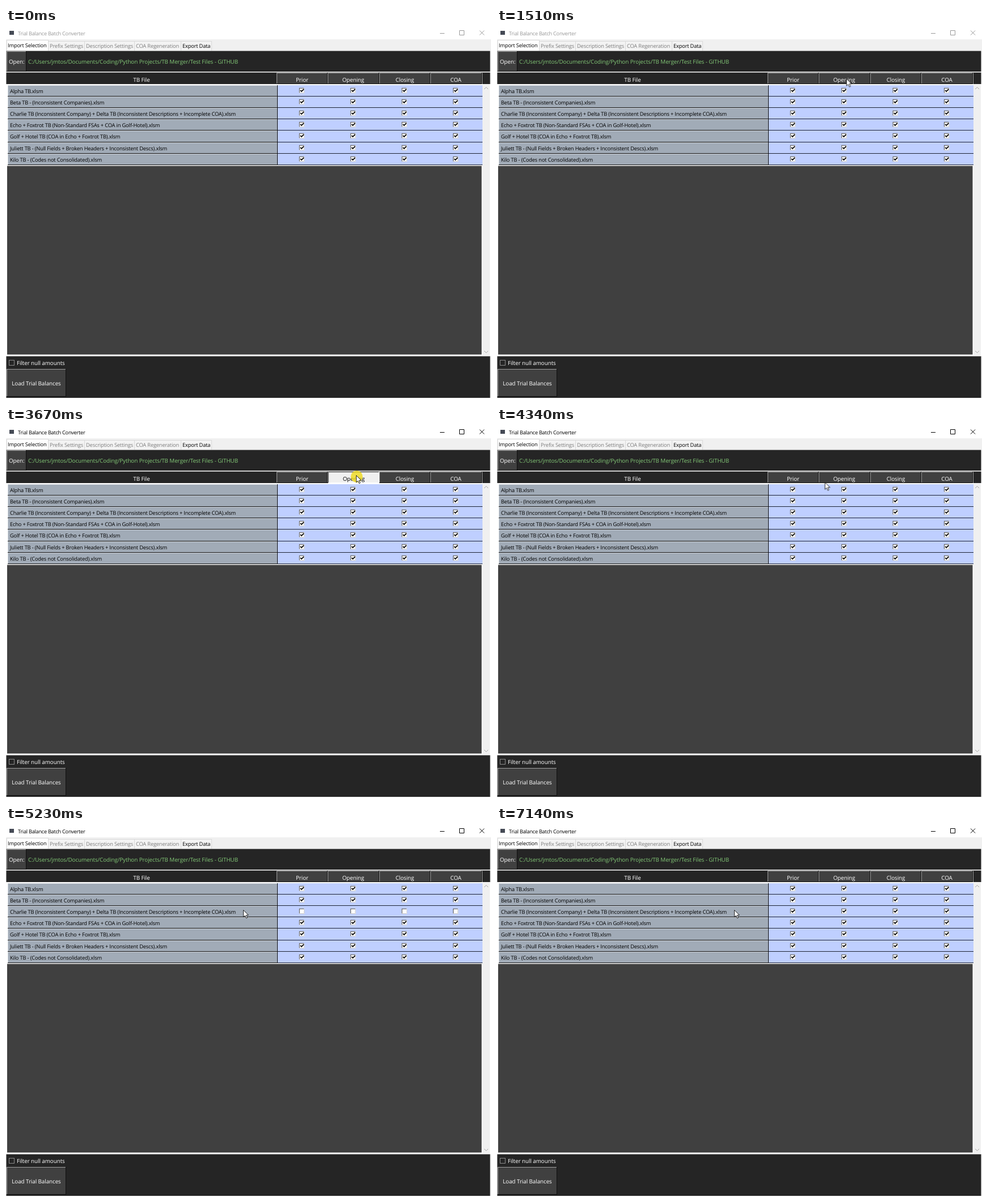
Recreate the animation shown at these times as an HTML page. Size 855x655 px, loop 8000 ms.

```html
<!DOCTYPE html>
<html lang="en">
<head>
<meta charset="utf-8">
<title>Trial Balance Batch Converter</title>
<style>
  html, body { margin: 0; width: 100%; height: 100%; overflow: hidden; background: #fff; }
  svg { display: block; width: 855px; height: 655px; }
  text {
    font: 9.9px "Open Sans", "Noto Sans", sans-serif;
    letter-spacing: -.09px;
    text-rendering: geometricPrecision;
    fill: #fff;
    white-space: pre;
  }
  .small { font-size: 9.3px; letter-spacing: -.18px; fill: #000; }
  .title { font-size: 9.2px; letter-spacing: -.26px; fill: currentColor; }
  .path { fill: #83c877; }
  .mid { text-anchor: middle; }
  .off { fill: #7d7d7d; }
  .line { fill: none; stroke: currentColor; }
  .dark { fill: #000; }

  .window, .press, .check-col, .check-row, .ring { animation: 8s step-end infinite; }
  .window { animation-name: focus; }
  .check-col { animation-name: col-toggle; }
  .check-row { animation-name: row-toggle; }
  .press { opacity: 0; }
  .press.head { animation-name: press-head; }
  .press.row { animation-name: press-row; }
  .ring { opacity: 0; animation-name: ring; }
  .pointer { animation: travel 8s linear infinite; }

  @keyframes focus { 0% { color: #999; } 25.5%, 100% { color: #000; } }
  @keyframes col-toggle { 0%, 45.875%, 100% { opacity: 1; } 26.125% { opacity: 0; } }
  @keyframes row-toggle { 0%, 87.625%, 100% { opacity: 1; } 64.375% { opacity: 0; } }
  @keyframes press-head {
    0%, 27.125%, 46.875%, 100% { opacity: 0; }
    26.125%, 45.875% { opacity: 1; }
  }
  @keyframes press-row {
    0%, 65.375%, 89.25%, 100% { opacity: 0; }
    64.375%, 87.625% { opacity: 1; }
  }
  @keyframes ring {
    0%, 27.125%, 46.875%, 65.375%, 89.25%, 100% { opacity: 0; }
    25.5%, 45.875%, 64.375%, 87.625% { opacity: .8; }
  }
  @keyframes travel {
    0% { transform: translate(818px, 670px); animation-timing-function: step-end; }
    3.125% { transform: translate(818px, 648px); animation-timing-function: cubic-bezier(.25, .45, .55, 1); }
    12.875% { transform: translate(615px, 203px); }
    13.25% { transform: translate(615px, 203px); animation-timing-function: cubic-bezier(.45, .1, .8, .8); }
    16.5% { transform: translate(612px, 147px); animation-timing-function: cubic-bezier(.2, .3, .5, 1); }
    19.875%, 31.625% { transform: translate(616px, 84px); }
    32.625%, 37.75% { transform: translate(616px, 90px); }
    40.75% { transform: translate(617px, 86px); animation-timing-function: step-end; }
    42.75% { transform: translate(617px, 85px); }
    51.625% { transform: translate(617px, 85px); animation-timing-function: cubic-bezier(.35, .1, .65, .9); }
    61.25%, 61.875% { transform: translate(426px, 145px); }
    62.25%, 100% { transform: translate(418px, 148px); }
  }
</style>
</head>
<body>
<svg viewBox="0 0 855 655">
  <rect width="855" height="655" fill="#fff"/>

  <g class="window">
    <rect x="6" y="5" width="8" height="7" fill="#454a55"/>
    <text class="title" x="21" y="12.6">Trial Balance Batch Converter</text>
    <path class="line" d="M765 9.5h8M799.5 4.5h8v8h-8zM835 4.5l8 8m0-8l-8 8"/>
  </g>

  <rect y="20" width="855" height="20" fill="#f0f0f0"/>
  <g id="tabs"></g>

  <rect x=".5" y="40.5" width="853" height="36.5" fill="#252525"/>
  <rect x=".5" y="78.5" width="853" height="20.5" fill="#252525"/>
  <rect x="2" y="243.5" width="836.5" height="333" fill="#404040"/>
  <rect x="840" y="100" width="13" height="478" fill="#f0f0f0"/>
  <rect x=".5" y="579.5" width="853" height="73.5" fill="#252525"/>
  <path d="M843 108l3.5-3.5 3.5 3.5M843 570l3.5 3.5 3.5-3.5" fill="none" stroke="#a3a3a3"/>

  <g id="buttons"></g>
  <text x="5" y="63">Open:</text>
  <text class="path" x="39" y="63">C:/Users/jmtos/Documents/Coding/Python Projects/TB Merger/Test Files - GITHUB</text>
  <text class="mid" x="239" y="94.5">TB File</text>
  <g id="table"></g>

  <rect x="5.5" y="586.5" width="9" height="9" fill="#252525" stroke="#8c8c8c"/>
  <text x="19" y="595">Filter null amounts</text>
  <text class="mid" x="53.5" y="631">Load Trial Balances</text>

  <g class="pointer">
    <circle class="ring" cx="1.3" cy="2.5" r="10.5" fill="#f0dc1e"/>
    <path d="M.5 .5v12.3l2.9-2.7 2.1 4.6 2-.9-2-4.5h3.9z" fill="#fff" stroke="#111" stroke-width=".9"/>
  </g>
</svg>

<script>
  const put = (id, markup) => document.getElementById(id).insertAdjacentHTML("beforeend", markup);
  const rect = (x, y, w, h, fill) =>
    `<rect x="${x}" y="${y}" width="${w}" height="${h}" fill="${fill}"/>`;
  const text = (x, y, label, cls = "") => `<text class="${cls}" x="${x}" y="${y}">${label}</text>`;

  // Raised box: light top and left edges, black bottom and right edges.
  const bevel = (x, y, w, h, fill, light, shade = "#111") =>
    rect(x, y, w, h, shade) + rect(x, y, w - 1, h - 1, light) + rect(x + 1, y + 1, w - 2, h - 2, fill);
  const button = (x, y, w, h) => bevel(x, y, w, h, "#404040", "#a0a0a0");

  const tabs = [
    ["Import Selection", 1, 74], ["Prefix Settings", 74, 138], ["Description Settings", 138, 226],
    ["COA Regeneration", 226, 308], ["Export Data", 308, 362]
  ];
  tabs.forEach(([label, left, right], i) => {
    const active = i === 0, top = active ? 21 : 23;
    put("tabs", rect(left, top, right - left + 1, 40 - top, "#d9d9d9")
      + rect(left + 1, top + 1, right - left - 1, 39 - top, active ? "#fff" : "#f3f3f3")
      + text(active ? 3 : left + 3, active ? 33.6 : 34.6, label, i % 4 ? "small off" : "small"));
  });

  put("buttons", button(1, 41, 35, 36) + button(1, 602, 105, 49));

  const heads = ["Prior", "Opening", "Closing", "COA"];
  const headX = i => Math.round(477 + 90.4 * i);
  heads.forEach((label, i) => {
    const x = headX(i);
    put("table", button(x, 79, headX(i + 1) - x, 20) + text(x + 45, 94.5, label, "mid"));
  });
  put("table", rect(839, 79, 1, 20, "#a0a0a0"));
  put("table", `<g class="press head">${bevel(568, 79, 90, 20, "#f0f0f0", "#555", "#fff")}${
    text(613, 95, "Opening", "mid dark")}</g>`);

  const files = [
    "Alpha TB.xlsm",
    "Beta TB - (Inconsistent Companies).xlsm",
    "Charlie TB (Inconsistent Company) + Delta TB (Inconsistent Descriptions + Incomplete COA).xlsm",
    "Echo + Foxtrot TB (Non-Standard FSAs + COA in Golf-Hotel).xlsm",
    "Golf + Hotel TB (COA in Echo + Foxtrot TB).xlsm",
    "Juliett TB - (Null Fields + Broken Headers + Inconsistent Descs).xlsm",
    "Kilo TB - (Codes not Consolidated).xlsm"
  ];
  const rowY = i => Math.round(100.6 + 20.2 * i);
  files.forEach((name, row) => {
    const y = rowY(row), h = rowY(row + 1) - y, picked = row === 2;
    put("table", bevel(3, y, 476, h, "#a1abb7", "#d0d5db") + text(7, y + 13.6, name, "small")
      + rect(479, y, 361, h, "#1c2233") + rect(479, y, 361, h - 1, "#bfcfff"));
    if (picked) {
      put("table", `<g class="press row">${bevel(3, y, 476, h, "#f0f0f0", "#555", "#fff")}${
        text(8, y + 14.1, name, "small")}</g>`);
    }

    let marks = "";
    heads.forEach((_, col) => {
      const x = 516.8 + 90.4 * col, top = y + 4.8;
      put("table", bevel(x, top, 9.5, 9.5, "#fff", "#505050", "#e3e3e3"));
      marks += `<path ${col === 1 ? 'class="check-col"' : ""} d="M${x + 2.2} ${top + 4}l2 2.2 4-4.2"
        fill="none" stroke="#000" stroke-width="1.8"/>`;
    });
    put("table", `<g class="${picked ? "check-row" : ""}">${marks}</g>`);
  });
</script>
</body>
</html>
```
